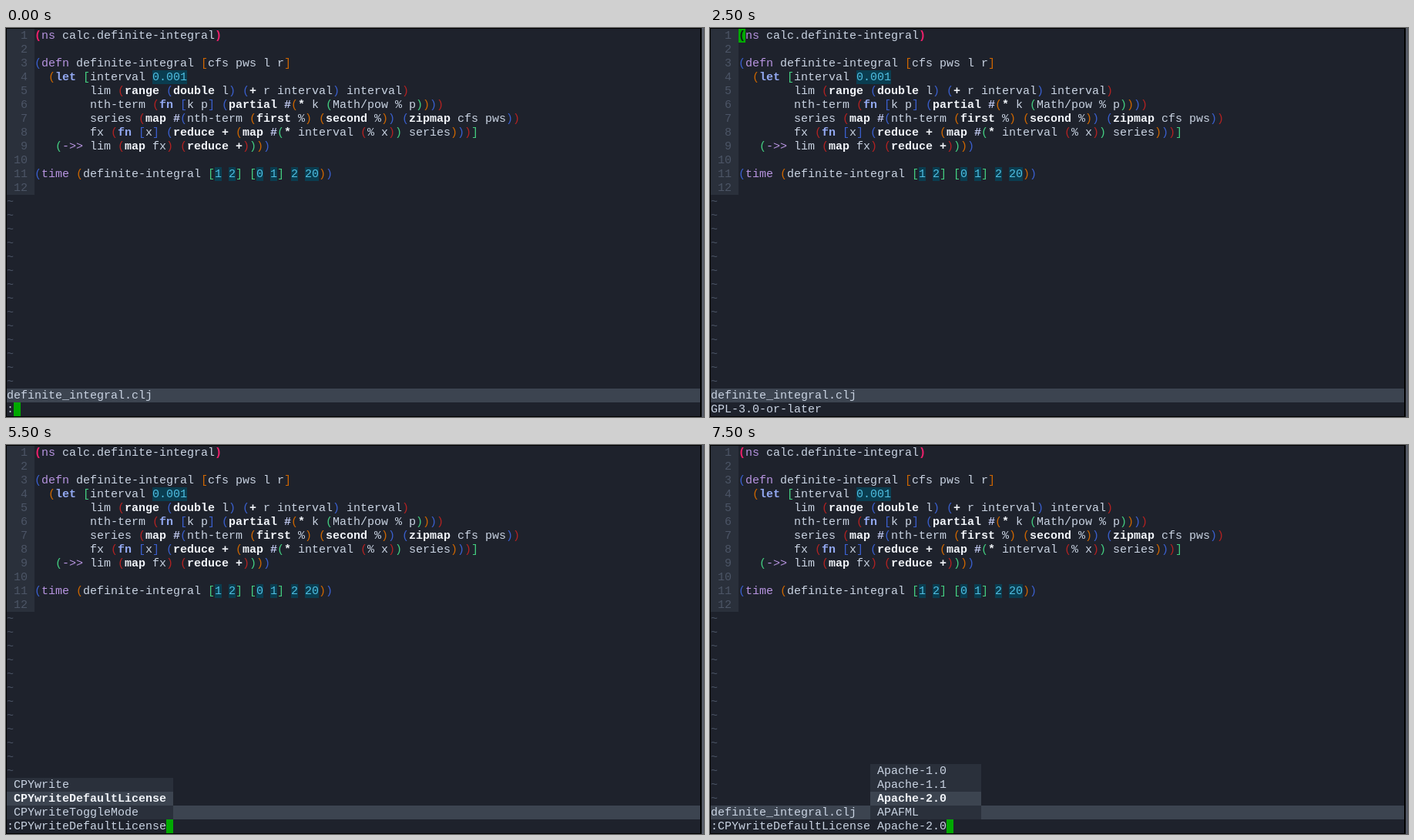
An HTML page that plays this animation: 906 by 506 pixels, repeating every 8000 ms.

```html
<!DOCTYPE html>
<html lang="en">
<head>
<meta charset="utf-8">
<title>Editor session</title>
<style>
  html, body { margin: 0; width: 100%; height: 100%; overflow: hidden; background: #000; }
  svg { display: block; width: 906px; height: 506px; }
  text { font: 15px "Liberation Mono", monospace; white-space: pre; fill: #c9d3e2; }
  .dim { fill: #4c5566; }
  .macro { fill: #b794e0; }
  .special { fill: #93a9f2; font-weight: bold; }
  .dispatch { fill: #c3cbf2; font-weight: bold; }
  .core, .chosen { fill: #f2f5fa; font-weight: bold; }
  .number { fill: #4fbde0; }
  .match { fill: #f0206c; font-weight: bold; }
  .covered { fill: #10151c; font-weight: bold; }
</style>
</head>
<body>
<svg id="stage" viewBox="0 0 906 506" xmlns="http://www.w3.org/2000/svg"></svg>
<script>
const CELL = 9, ROW = 18, LOOP = 8000;
const COLORS = {
  base: '#1e222c', panel: '#2a303b', bar: '#3c4450', edge: '#565b66', digit: '#0a3d50', cursor: '#00a900'
};
const RAINBOW = ['#3a5fcd', '#cd6600', '#43cd80', '#b22222'];
const CODE = `(ns calc.definite-integral)

(defn definite-integral [cfs pws l r]
  (let [interval 0.001
        lim (range (double l) (+ r interval) interval)
        nth-term (fn [k p] (partial #(* k (Math/pow % p))))
        series (map #(nth-term (first %) (second %)) (zipmap cfs pws))
        fx (fn [x] (reduce + (map #(* interval (% x)) series)))]
   (->> lim (map fx) (reduce +))))

(time (definite-integral [1 2] [0 1] 2 20))
`;
const WORDS = {
  macro: ['ns', 'defn', 'time', '->>'],
  special: ['let', 'fn'],
  dispatch: ['#'],
  core: ['range', 'double', 'partial', 'map', 'first', 'second', 'zipmap', 'reduce', '+', '*']
};

const stage = document.getElementById('stage');

function add(parent, name, attrs, content) {
  const node = document.createElementNS('http://www.w3.org/2000/svg', name);
  for (const key in attrs) node.setAttribute(key, attrs[key]);
  if (content !== undefined) node.textContent = content;
  return parent.appendChild(node);
}
const colX = col => 1 + col * CELL;
const rowY = row => 1 + row * ROW;
const block = (parent, col, row, cols, rows, fill) => add(parent, 'rect',
  { x: colX(col), y: rowY(row), width: cols * CELL, height: rows * ROW, fill });
const write = (parent, col, row, content, cls = '') => add(parent, 'text',
  { x: colX(col), y: rowY(row) + 13, class: cls }, content);
const wordClass = word => /^[\d.]+$/.test(word) ? 'number'
  : Object.keys(WORDS).find(key => WORDS[key].includes(word)) || '';

function drawCode() {
  let depth = 0;
  CODE.split('\n').forEach((line, row) => {
    write(stage, 0, row, String(row + 1).padStart(3), 'dim');
    let col = 4;
    for (const token of line.match(/[()[\]]|#|\s+|[^\s()[\]#]+/g) || []) {
      if (/[()[\]]/.test(token)) {
        const opening = '(['.includes(token);
        if (!opening) depth--;
        const node = write(stage, col, row, token, row ? '' : 'match');
        if (row) node.style.fill = RAINBOW[depth % 4];
        if (opening) depth++;
      } else if (token.trim()) {
        const cls = wordClass(token);
        if (cls === 'number') block(stage, col, row, token.length, 1, COLORS.digit);
        write(stage, col, row, token, cls);
      }
      col += token.length;
    }
  });
}

add(stage, 'rect', { x: 1, y: 1, width: 900, height: 504, fill: COLORS.base });
add(stage, 'rect', { x: 903, y: 0, width: 3, height: 506, fill: COLORS.edge });
block(stage, 0, 0, 4, 12, COLORS.panel);
drawCode();
for (let row = 12; row < 26; row++) write(stage, 0, row, '~', 'dim');
block(stage, 0, 26, 100, 1, COLORS.bar);
write(stage, 0, 26, 'definite_integral.clj');
const overlay = add(stage, 'g');

const commands = { col: 0, cols: 24, items: ['CPYwrite', 'CPYwriteDefaultLicense', 'CPYwriteToggleMode'] };
const licenses = { col: 23, cols: 16, items: ['Apache-1.0', 'Apache-1.1', 'Apache-2.0', 'APAFML'] };
const SET = ':CPYwriteDefaultLicense';
const STEPS = [
  { at: 0, line: ':' },
  { at: 500, line: ':C' },
  { at: 1000, line: ':CPY' },
  { at: 1500, line: ':CPYwrite', menu: commands, pick: 0 },
  { at: 2000, line: SET, menu: commands, pick: 1 },
  { at: 2500, line: 'GPL-3.0-or-later', home: true },
  { at: 3500, line: ':' },
  { at: 4000, line: ':CPY' },
  { at: 4500, line: ':CPYwrite', menu: commands, pick: 0 },
  { at: 5500, line: SET, menu: commands, pick: 1 },
  { at: 6000, line: SET + ' A' },
  { at: 6500, line: SET + ' Apa' },
  { at: 7000, line: SET + ' Apache-1.1', menu: licenses, pick: 1 },
  { at: 7500, line: SET + ' Apache-2.0', menu: licenses, pick: 2 }
];

function drawMenu({ col, cols, items }, pick) {
  items.forEach((item, i) => {
    const row = 27 - items.length + i;
    block(overlay, col, row, cols, 1, i === pick ? COLORS.bar : COLORS.panel);
    write(overlay, col + 1, row, item, i === pick ? 'chosen' : '');
  });
}

function drawStep({ line, menu, pick, home }) {
  overlay.replaceChildren();
  if (menu) drawMenu(menu, pick);
  write(overlay, 0, 27, line);
  if (home) {
    block(overlay, 4, 0, 1, 1, COLORS.cursor);
    write(overlay, 4, 0, '(', 'covered');
  } else {
    block(overlay, line.length, 27, 1, 1, COLORS.cursor);
  }
}

let current;
function update() {
  const time = performance.now() % LOOP;
  const step = STEPS.findLast(s => s.at <= time);
  if (step !== current) drawStep(current = step);
  requestAnimationFrame(update);
}
update();
</script>
</body>
</html>
```
